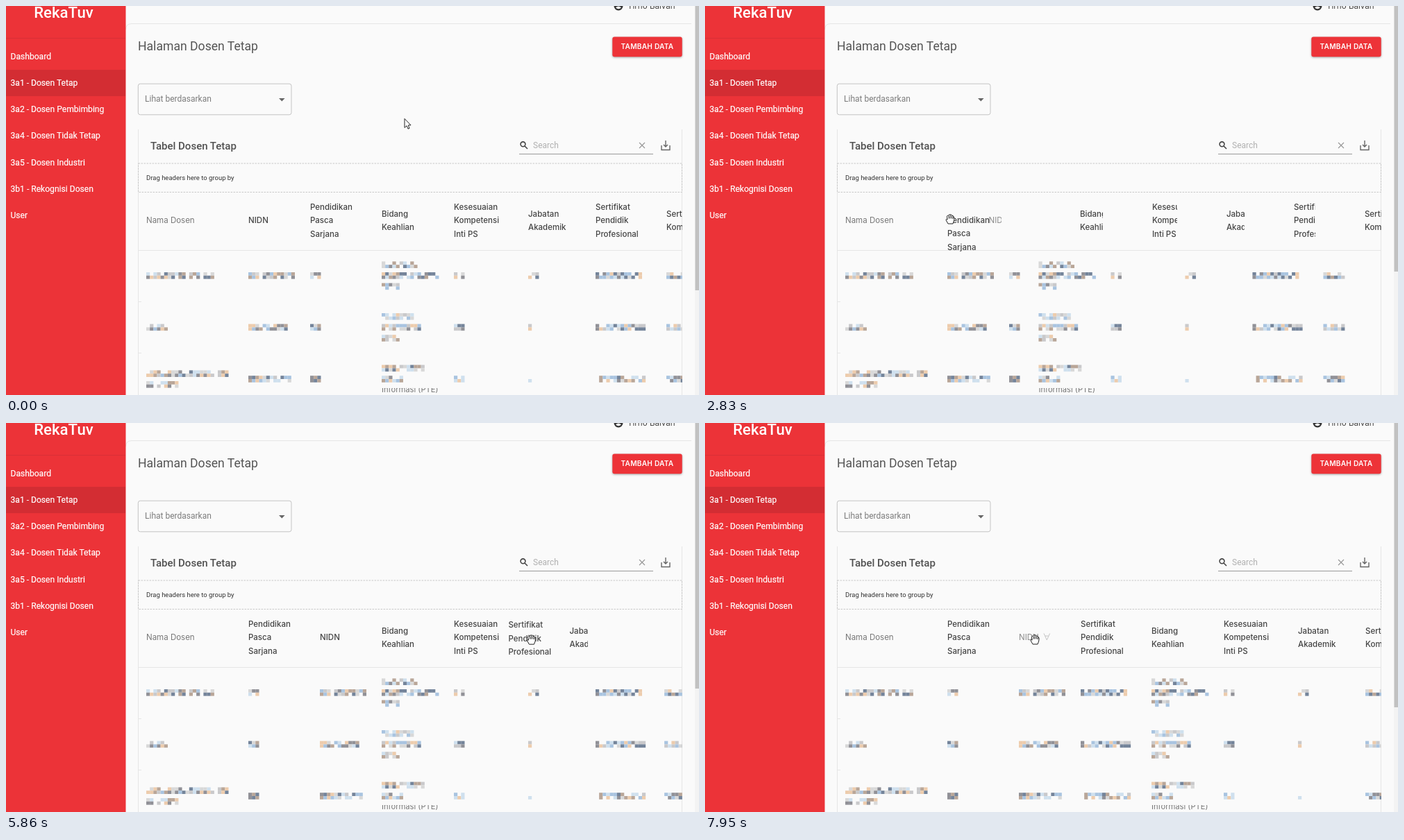
These frames come from a looping animation (998 by 561 pixels, 8 s). An HTML page:

```html
<!DOCTYPE html>
<html lang="id">
<head>
<meta charset="utf-8">
<title>Tabel Dosen</title>
<style>
  html, body { margin: 0; width: 100%; height: 100%; overflow: hidden; background: #fafafa; }
  #stage { position: relative; width: 998px; height: 561px; overflow: hidden; }
  #stage > * { position: absolute; left: 0; top: 0; width: 998px; height: 561px; }
  svg text { font-family: Roboto, sans-serif; }
  .menu text { font-size: 12.1px; fill: #fff; stroke: #fff; stroke-width: .2px; }
  .field { font-size: 12px; fill: #7c7c7c; }
  .button { fill: #ed3338; filter: drop-shadow(0 1px 1.5px rgba(0, 0, 0, .35)); }
  .table { clip-path: inset(0 24px 0 190px); }
  .head { position: absolute; font: 500 11.5px/19.2px Inter, sans-serif; color: #444; white-space: pre; overflow-x: clip; overflow-y: visible; }
  .head.light { font-weight: 400; color: #777; }
  .head.hover { font-weight: 400; color: #8b8b8b; }
  .line { fill: none; stroke: #e6e6e6; }
  .cursor path { fill: #fff; stroke: #222; stroke-width: 1; stroke-linejoin: round; }
</style>
</head>
<body>
<div id="stage">
  <svg viewBox="0 0 998 561">
    <rect width="998" height="561" fill="#fafafa"/>
    <path class="line" d="M172.5 34Q172.5 25.5 181 25.5H987"/>
    <rect width="172.5" height="561" fill="#ec3338"/>
    <rect y="92" width="172" height="38" fill="#d32d33"/>
    <path d="M0 46.5H172" stroke="#d93036"/>
    <text x="83" y="17" text-anchor="middle" font-size="22.2" font-weight="500" fill="#fff">RekaTuv</text>
    <g class="menu" id="menu"></g>

    <circle cx="882" cy="0" r="6.5" fill="#333"/>
    <path d="M878 2.2Q882 -1 886 2.2Q882 6.5 878 2.2Z" fill="#fafafa"/>
    <text x="895" y="3.5" style="font:400 11.6px Inter,sans-serif" fill="#444">Tirno Balvan</text>

    <text x="190" y="64" font-size="17.6" fill="#555">Halaman Dosen Tetap</text>
    <rect class="button" x="873.3" y="44.5" width="100.4" height="28.7" rx="3"/>
    <text x="923.5" y="62.3" text-anchor="middle" style="font:600 10.2px Inter,sans-serif;letter-spacing:.2px" fill="#fff">TAMBAH DATA</text>

    <rect x="190.3" y="112.2" width="220.7" height="44.6" rx="3" fill="none" stroke="#c4c4c4"/>
    <text class="field" x="200" y="138">Lihat berdasarkan</text>
    <path d="M393 133h8.6l-4.3 4.4z" fill="#666"/>

    <path class="line" d="M190.5 178V561M973.5 178V561M190 352.5H974M190 426.5h5M190 500.5h5"/>
    <rect x="190.5" y="227" width="783" height="41.5" fill="none" stroke="#c8c8c8" stroke-dasharray="2.5 1.5"/>
    <text x="208" y="206.5" font-size="15" font-weight="500" fill="#505050">Tabel Dosen Tetap</text>
    <text x="202" y="250.7" font-size="9.5" fill="#333">Drag headers here to group by</text>

    <g fill="none" stroke="#444" stroke-width="1.6">
      <circle cx="744.5" cy="199.3" r="3.4"/>
      <path d="M747 202l4 4"/>
      <path d="M912 197l8 8m0-8l-8 8" stroke="#999" stroke-width="1.2"/>
      <path d="M944 201v6.5h12V201M950 194v9m-3-3l3 3 3-3" stroke="#666" stroke-width="1.4"/>
    </g>
    <text class="field" x="759" y="205" style="fill:#b0b0b0">Search</text>
    <path d="M739 213.5H932" stroke="#9a9a9a"/>

    <rect x="992" width="6" height="561" fill="#f3f3f3"/>
    <rect id="thumb" x="992.5" width="5.5" height="410" fill="#c1c1c1"/>
  </svg>

  <svg class="table" id="cells" viewBox="0 0 998 561"></svg>
  <div class="table" id="heads"></div>

  <svg viewBox="0 0 998 561">
    <path id="sort" d="M0 0L4.3 9.5 8.6 0M2 3.6H6.6" fill="none" stroke="#c4c4c4"/>
    <g class="cursor" id="cursor">
      <circle id="glow" cx="-3" cy="0" r="9" fill="#ffe11e" opacity=".7"/>
      <path id="arrow" d="M-4-7.5V5.5L-1 2.7 1 7.2 3 6.3 1.2 2 5 1.8Z"/>
      <path id="hand" d="M-3 7L-6 1.6Q-6-.4-3.8 1L-4.6-3.6Q-4-5.6-2.4-4.4Q-2-7 0-6Q1.8-7 2.4-4.8Q4.8-5.4 4.8-3Q6.4-3 6.2-1Q6 3 4 7ZM-2-4L-1.6-.5M.2-5.5V-.5M2.4-4.5V-.5M4.6-3L4.2 0"/>
      <path id="pointer" transform="translate(0 5)" d="M-2 7L-6 1.5Q-6-.5-3.4 1V-6Q-2.4-8-1.2-6V-1.5Q1-2.6 1.4-1Q3.4-1.8 3.6 0Q5.8-.6 5.8 1.4Q5.8 4 4.4 7Z"/>
    </g>
  </svg>
</div>

<script>
const LOOP = 8000;
const HEAD_Y = 310;      // middle of the header row
const GAP = 59.5;        // how far headers step aside for a dragged one
const BLOCK = 5.15;
const DROP_TIME = 400;

const $ = id => document.getElementById(id);
const show = (id, on) => { $(id).style.display = on ? '' : 'none'; };
const place = (el, x, y) => el.setAttribute('transform', `translate(${x} ${y})`);
const clamp = k => Math.max(0, Math.min(1, k));
const smooth = k => { k = clamp(k); return k * k * (3 - 2 * k); };
const easeOut = k => 1 - (1 - clamp(k)) ** 3;
const mix = (a, b, k) => a + (b - a) * k;

function svg(tag, attrs, parent) {
  const el = document.createElementNS('http://www.w3.org/2000/svg', tag);
  for (const k in attrs) el.setAttribute(k, attrs[k]);
  return parent.appendChild(el);
}

['Dashboard', '3a1 - Dosen Tetap', '3a2 - Dosen Pembimbing', '3a4 - Dosen Tidak Tetap',
 '3a5 - Dosen Industri', '3b1 - Rekognisi Dosen', 'User'].forEach((label, i) => {
  svg('text', { x: 6.5, y: 76.5 + i * 38.3 }, $('menu')).textContent = label;
});

let seed = 11;
const random = () => (seed = seed * 16807 % 2147483647) / 2147483647;
const tones = ['#919197', '#c9c9cb', '#a9c4e0', '#cfe0ee', '#edccad', '#74849a', '#d8d8d8', '#b9a698'];

function mosaic(parent, y, count) {
  for (let i = 0; i < count * 2; i++)
    if (random() < .8)
      svg('rect', { x: (i >> 1) * BLOCK, y: y + i % 2 * 4.8, width: 5.2, height: 4.8,
                    fill: tones[Math.floor(random() * tones.length)] }, parent);
}

// rows: blocks in each text line of the three table rows
function makeColumn(label, width, rows) {
  const cells = svg('g', {}, $('cells'));
  rows.forEach((lines, r) => lines.forEach((count, i) =>
    mosaic(cells, 384 + r * 74.6 + (i - (lines.length - 1) / 2) * 15.6, count)));

  const head = document.createElement('div');
  head.className = 'head';
  head.textContent = label;
  $('heads').append(head);
  return { cells, head, width, labelWidth: head.offsetWidth,
           top: HEAD_Y - 9.6 * label.split('\n').length,
           narrow: Math.max(...rows.flat()) * BLOCK + 27 };
}

const columns = {
  N: makeColumn('Nama Dosen', 147, [[19], [6], [23, 9]]),
  D: makeColumn('NIDN', 89, [[13], [12], [12]]),
  P: makeColumn('Pendidikan\nPasca\nSarjana', 103, [[3], [3], [3]]),
  B: makeColumn('Bidang\nKeahlian', 104, [[10, 16, 5], [9, 12, 5], [12, 6, 0]]),
  K: makeColumn('Kesesuaian\nKompetensi\nInti PS', 107, [[3], [3], [3]]),
  J: makeColumn('Jabatan\nAkademik', 97, [[3], [1], [1]]),
  S: makeColumn('Sertifikat\nPendidik\nProfesional', 102, [[13], [14], [14]]),
  X: makeColumn('Sertifikat\nKompetensi', 102, [[6], [6], [6]])
};
columns.N.head.classList.add('light');
svg('text', { y: 557, fill: '#777', style: 'font:400 11.2px Inter,sans-serif' }, columns.B.cells)
  .textContent = 'Informasi (PTE)';
svg('rect', { y: 545, width: 90, height: 6, fill: '#fafafa' }, columns.B.cells);

const drags = [
  { col: 'P', order: 'NDPBKJSX', grab: 1440, drop: 2460, end: 2911, x: 349, y: 19 },
  { col: 'S', order: 'NPDBKJSX', grab: 5470, drop: 6400, end: 6940, x: 541, y: 0 }
];
const lastOrder = 'NPDSBKJX';

// Cursor moves: start, end, target x, target y
const moves = [
  [360, 900, 463, 307], [1440, 2320, 353, 307], [2910, 3220, 430, 222], [3300, 3500, 473, 210],
  [3500, 3850, 690, 278], [3850, 4070, 659, 295], [4180, 4420, 520, 305], [4420, 4950, 882, 311],
  [5470, 6400, 553, 314], [7550, 7950, 475, 312]
];

function cursorAt(t) {
  let x = 578, y = 170;
  for (const [start, end, toX, toY] of moves) {
    const k = smooth((t - start) / (end - start));
    x = mix(x, toX, k);
    y = mix(y, toY, k);
  }
  return [x, y];
}

function draggedBy(drag, fromX, t) {
  const [x0, y0] = cursorAt(drag.grab);
  const [x1, y1] = cursorAt(Math.min(t, drag.drop));
  const k = easeOut((t - drag.drop) / DROP_TIME);
  return [mix(fromX + x1 - x0, drag.x, k), mix(y1 - y0, drag.y, k)];
}

function draw(t) {
  const next = drags.find(d => t < d.end);
  const drag = next && t >= next.grab ? next : null;
  const order = [...(next ? next.order : lastOrder)];
  const [cursorX, cursorY] = cursorAt(t);
  const overHeads = cursorY > 272 && (!drag || t >= drag.drop);

  let x = 202;
  const lefts = {};
  for (const key of order) {
    lefts[key] = x;
    x += drag && key === drag.col ? columns[key].narrow : columns[key].width;
  }
  const held = drag && draggedBy(drag, lefts[drag.col], t);

  show('sort', false);
  for (const key of order) {
    const c = columns[key], left = lefts[key];
    const isHeld = drag && key === drag.col;
    let push = 0;
    if (drag && !isHeld)
      push = left > lefts[drag.col] ? 1 : smooth((left + 40 - held[0]) / 30);

    const headX = isHeld ? held[0] : left + GAP * push;
    const shownWidth = c.width - 71;
    place(c.cells, left, 0);
    c.head.style.left = headX + 'px';
    c.head.style.top = c.top + (isHeld ? held[1] : 0) + 'px';
    c.head.style.width = push > 0 ? shownWidth + 'px' : 'auto';

    const hover = overHeads && !isHeld && cursorX > left - 4 && cursorX < left + c.labelWidth;
    c.head.classList.toggle('hover', hover);
    const iconX = push > 0 ? shownWidth - 24 : c.labelWidth + 7;
    if (hover && iconX > 0) {
      show('sort', true);
      place($('sort'), headX + iconX, HEAD_Y - 6.5);
    }
  }

  const pressed = t - drags[1].drop;
  const pointing = pressed >= 0 && t < drags[1].end;
  $('thumb').setAttribute('height', drag ? 383 : 410);
  place($('cursor'), cursorX, cursorY);
  show('glow', pressed >= 0 && pressed < 300);
  show('pointer', pointing);
  show('arrow', !pointing && cursorY < 275);
  show('hand', !pointing && cursorY >= 275);
}

const begin = performance.now();
function tick() {
  draw((performance.now() - begin) % LOOP);
  requestAnimationFrame(tick);
}
tick();
</script>
</body>
</html>
```
